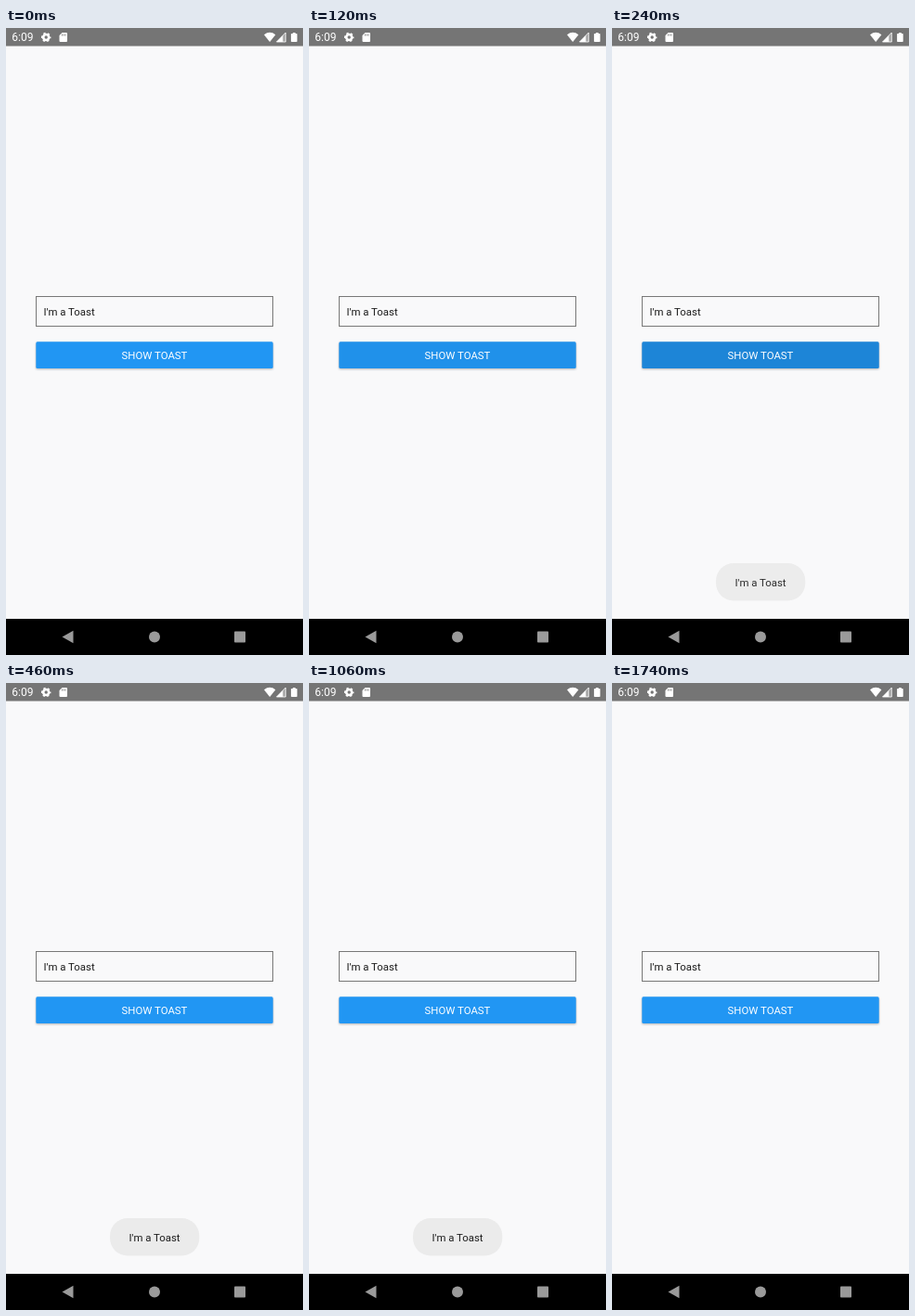
Write an HTML page that moves like this. It is 320 by 676 pixels and loops after 1.82 s.

```html
<!DOCTYPE html>
<html lang="en">
<head>
<meta charset="utf-8">
<style>
  html, body { margin: 0; width: 100%; height: 100%; overflow: hidden; background: #f9f9fa; }
  svg { display: block; width: 320px; height: 676px; }
  text { font: 11.4px Roboto, sans-serif; fill: #1c1c1c; }
  .mid { text-anchor: middle; }
  .white, .white text { fill: #fff; }
  #button { filter: drop-shadow(0 1.3px 1.2px rgba(0, 0, 0, .28)); }
</style>
</head>
<body>
<svg viewBox="0 0 320 676">
  <rect width="320" height="676" fill="#f9f9fa"/>

  <!-- Status bar -->
  <rect width="320" height="19.5" fill="#757575"/>
  <g class="white">
    <text x="6.3" y="14.2" style="font-size:12px">6:09</text>
    <circle cx="43.2" cy="10" r="3" fill="none" stroke="#fff" stroke-width="2.6"/>
    <circle cx="43.2" cy="10" r="4.5" fill="none" stroke="#fff" stroke-width="1.5"
      stroke-dasharray="2.3 2.412" stroke-dashoffset="1.15"/>
    <path d="M60.5 5H65q1 0 1 1v8q0 1-1 1h-6.500q-1 0-1-1V8z"/>
    <path d="M60.500 6.500v2M62.300 6.500v2M64.100 6.500v2" stroke="#757575" stroke-width=".8"/>
    <path d="M278 7.200Q284.200 2.500 290.400 7.200L284.200 15z"/>
    <path d="M301.300 5V15H291.500z" fill-opacity=".35"/>
    <path d="M298.300 8V15H291.500z"/>
    <path d="M301.300 5V15H291.500z" fill="none" stroke="#fff" stroke-width=".8"/>
    <path d="M309 5h2.800v1H313q.7 0 .7.700v7.600q0 .7-.7.700h-5.200q-.7 0-.7-.7V6.700q0-.7.7-.7H309z"/>
  </g>

  <!-- Form -->
  <rect x="32.5" y="289.5" width="255" height="32" fill="none" stroke="#777"/>
  <text x="40.5" y="310.300">I'm a Toast</text>
  <rect id="button" x="32.300" y="338.300" width="255.400" height="28.700" rx="1.6" fill="#2196f3"/>
  <rect id="ripple" x="32.300" y="338.300" width="255.400" height="28.700" rx="1.6" opacity="0"/>
  <text class="mid white" x="160" y="357.200">SHOW TOAST</text>

  <!-- Toast -->
  <g id="toast" opacity="0">
    <rect x="112" y="577" width="96.300" height="40.500" rx="19" fill="#ebebeb"/>
    <text class="mid" x="160" y="601.800">I'm a Toast</text>
  </g>

  <!-- Navigation bar -->
  <rect y="637" width="320" height="39"/>
  <g fill="#9a9a9a">
    <path d="M60.500 656.500L72.500 649.800V663.200z"/>
    <circle cx="160" cy="656.500" r="6"/>
    <rect x="246" y="650.500" width="12" height="12" rx=".8"/>
  </g>
</svg>
<script>
  const LOOP = 1820;
  const ramp = (t, from, to) => Math.min(1, Math.max(0, (t - from) / (to - from)));
  const fade = (id, value) => document.getElementById(id).setAttribute('opacity', value);

  function draw() {
    const t = performance.now() % LOOP;
    fade('ripple', 0.13 * (ramp(t, 100, 180) - ramp(t, 220, 400)));
    fade('toast', ramp(t, 130, 250) - ramp(t, 1520, 1630));
    requestAnimationFrame(draw);
  }
  draw();
</script>
</body>
</html>
```
